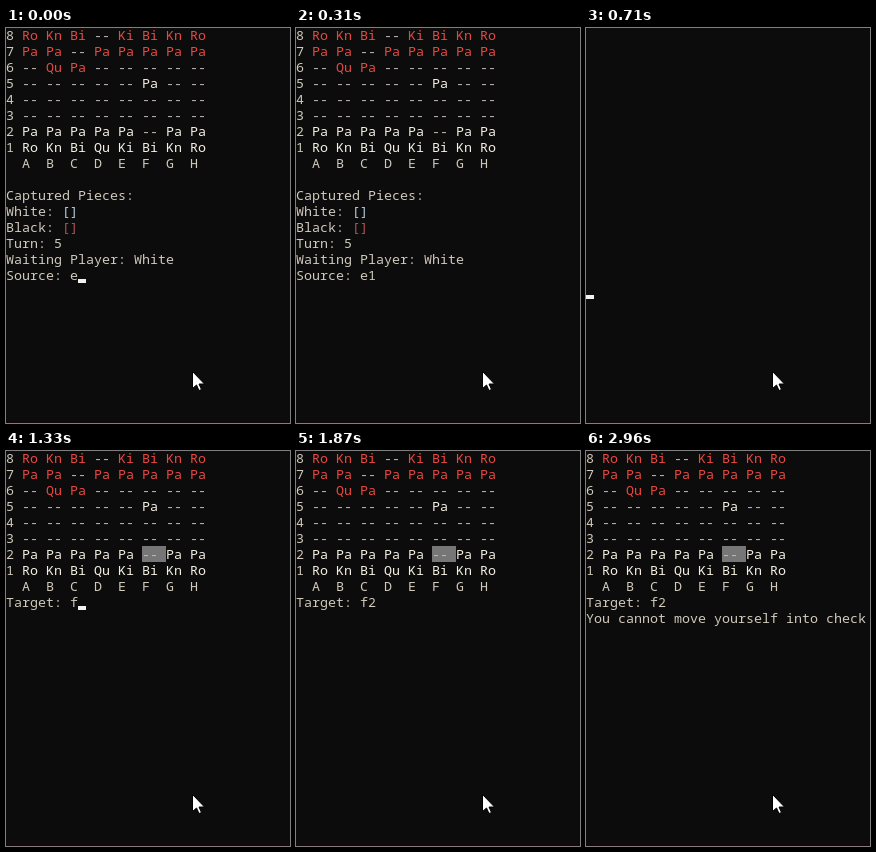
An HTML page with a canvas for the animation above (3.42 s loop, 284 px wide and 395 px high).

```html
<!DOCTYPE html>
<html>
<head>
<meta charset="utf-8">
<style>
html, body { margin: 0; width: 100%; height: 100%; overflow: hidden; background: #0c0c0c; }
canvas { display: block; }
</style>
</head>
<body>
<canvas id="stage" width="284" height="395"></canvas>
<script>
const ctx = document.getElementById('stage').getContext('2d');
const LOOP = 3420, CELL_W = 8, CELL_H = 16;
const PLAIN = '#d0c9bc', DASH = '#c4b8b4', WHITE = '#f4efe2', RED = '#e84844';
const BOARD = [
  'Ro Kn Bi -- Ki Bi Kn Ro',
  'Pa Pa -- Pa Pa Pa Pa Pa',
  '-- Qu Pa -- -- -- -- --',
  '-- -- -- -- -- Pa -- --',
  '-- -- -- -- -- -- -- --',
  '-- -- -- -- -- -- -- --',
  'Pa Pa Pa Pa Pa -- Pa Pa',
  'Ro Kn Bi Qu Ki Bi Kn Ro'
];

function print(text, col, row, color = PLAIN) {
  ctx.fillStyle = color;
  [...text].forEach((ch, i) => ctx.fillText(ch, (col + i) * CELL_W, row * CELL_H + 12));
}

function block(col, row, cols, height, color) {
  ctx.fillStyle = color;
  ctx.fillRect(col * CELL_W, row * CELL_H + 15 - height, cols * CELL_W, height);
}

const caret = (col, row) => block(col, row, 1, 4, '#f2f2f2');

function drawBoard(highlight) {
  if (highlight) block(17, 6, 3, CELL_H, '#767676');
  BOARD.forEach((line, row) => {
    print(String(8 - row), 0, row);
    line.split(' ').forEach((piece, i) => {
      const color = piece === '--' ? DASH : row < 3 ? RED : WHITE;
      print(piece, 2 + 3 * i, row, color);
    });
  });
  [...'ABCDEFGH'].forEach((file, i) => print(file, 2 + 3 * i, 8));
}

// Typed prompt: first key, second key, then the caret blinks off
function prompt(label, keys, row, t, [first, second, blink]) {
  const text = label + keys.slice(0, (t >= first) + (t >= second));
  print(text, 0, row);
  if (t < blink) caret(text.length, row);
}

function drawSource(t) {
  drawBoard(false);
  print('Captured Pieces:', 0, 10);
  print('White: ', 0, 11);
  print('[]', 7, 11, '#b2d0e6');
  print('Black: ', 0, 12);
  print('[]', 7, 12, '#b84f58');
  print('Turn: 5', 0, 13);
  print('Waiting Player: White', 0, 14);
  prompt('Source: ', 'e1', 15, t, [0, 80, 310]);
}

function drawTarget(t) {
  drawBoard(true);
  prompt('Target: ', 'f2', 9, t, [1330, 1410, 1870]);
  if (t >= 2100) {
    print('You cannot move yourself into check', 0, 10);
    if (t < 2960) caret(0, 11);
  }
}

function drawPointer() {
  const arrow = new Path2D('M186.5 343.5V360.5L190.5 357L193 362.5L195.5 361.5L193 356H198.5Z');
  ctx.fillStyle = '#fff';
  ctx.strokeStyle = '#000';
  ctx.fill(arrow);
  ctx.stroke(arrow);
}

function frame(now) {
  const t = now % LOOP;
  ctx.fillStyle = '#0c0c0c';
  ctx.fillRect(0, 0, 284, 395);
  ctx.fillStyle = '#16060c';
  ctx.fillRect(0, 393, 284, 2);
  ctx.font = '13.333px "Noto Sans Mono", monospace';
  if (t < 710) drawSource(t);
  else if (t < 780) caret(0, 16);
  else drawTarget(t);
  drawPointer();
}

const start = performance.now();
function tick() {
  frame(performance.now() - start);
  requestAnimationFrame(tick);
}
tick();
</script>
</body>
</html>
```
